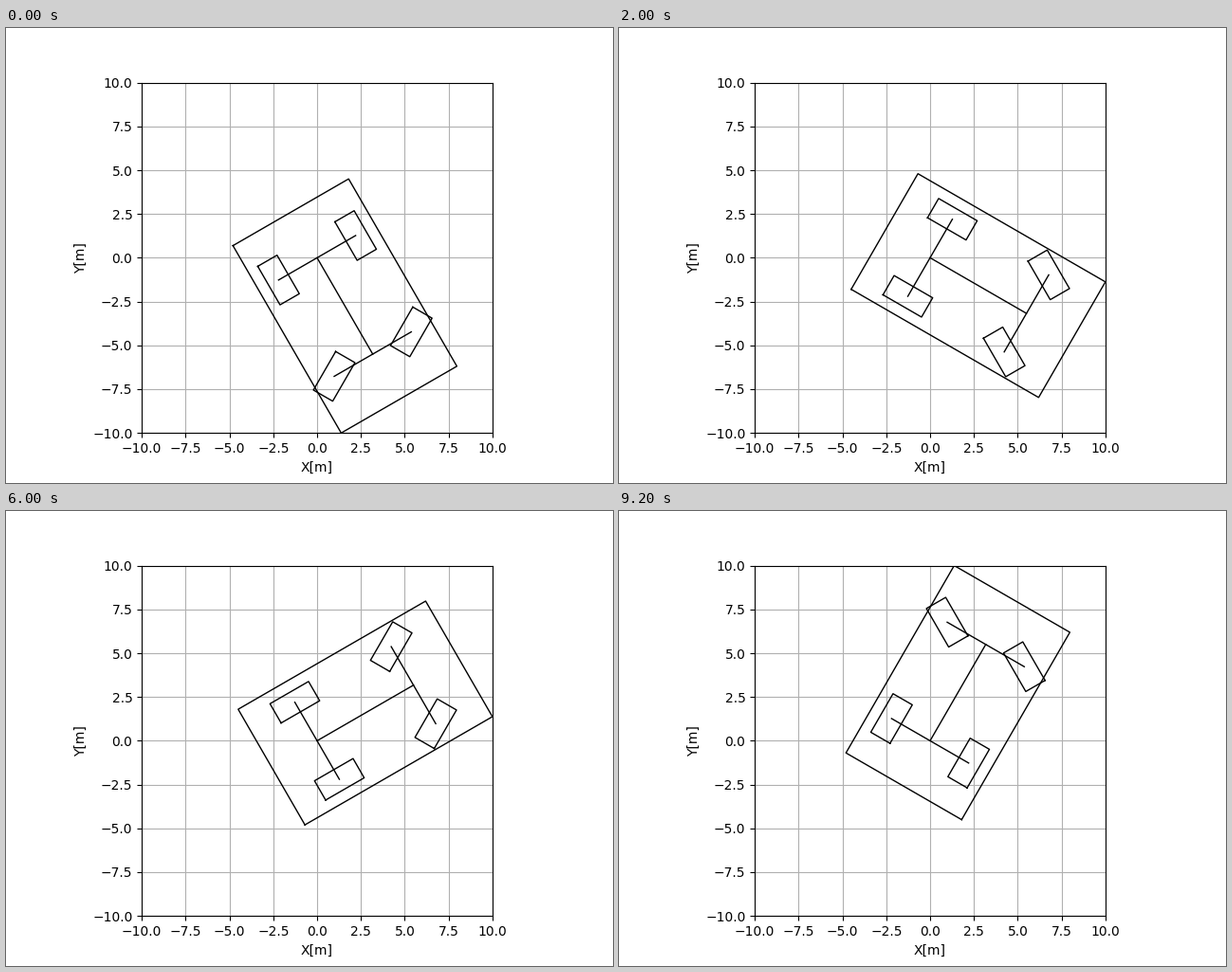
These frames come from a looping animation (640x480 px, 10000 ms). A matplotlib script:

```python
import numpy as np
import matplotlib.pyplot as plt
from matplotlib.animation import FuncAnimation

UNIT = 2.54
WHEELBASE = 2.5 * UNIT
HALF_TREAD = UNIT
HALF_WIDTH = 1.5 * UNIT
OVERHANG = 3.0
ANGLES = [-60, -30, 0, 30, 60]  # yaw, with the steering angle equal to it


def rotate(points, deg):
    a = np.radians(deg)
    c, s = np.cos(a), np.sin(a)
    return np.asarray(points) @ np.array([[c, s], [-s, c]])


def box(x0, x1, y0, y1):
    return np.array([(x0, y0), (x1, y0), (x1, y1), (x0, y1), (x0, y0)])


def wheel(x, y, steer=0):
    shape = box(-UNIT / 2, UNIT / 2, -UNIT / 4, UNIT / 4)
    return rotate(shape, steer) + (x, y)


def axle(x):
    return [(x, -HALF_TREAD), (x, HALF_TREAD)]


def vehicle(yaw, steer):
    parts = [
        box(-OVERHANG, WHEELBASE + OVERHANG, -HALF_WIDTH, HALF_WIDTH),
        [(0, 0), (WHEELBASE, 0)],
        axle(0),
        axle(WHEELBASE),
    ]
    for side in (-HALF_TREAD, HALF_TREAD):
        parts += [wheel(0, side), wheel(WHEELBASE, side, steer)]
    return [rotate(p, yaw) for p in parts]


fig, ax = plt.subplots(figsize=(6.4, 4.8), dpi=100)
ax.set_aspect("equal")
ax.set(xlim=(-10, 10), ylim=(-10, 10), xlabel="X[m]", ylabel="Y[m]")
ticks = np.arange(-10, 10.1, 2.5)
ax.set_xticks(ticks)
ax.set_yticks(ticks)
ax.grid(True)
lines = [ax.plot([], [], color="black", lw=1)[0] for _ in range(8)]


def update(i):
    angle = ANGLES[i]
    for line, part in zip(lines, vehicle(angle, angle)):
        line.set_data(*part.T)
    return lines


anim = FuncAnimation(fig, update, frames=len(ANGLES), interval=2000,
                     repeat=True, repeat_delay=0)
plt.show()
```
